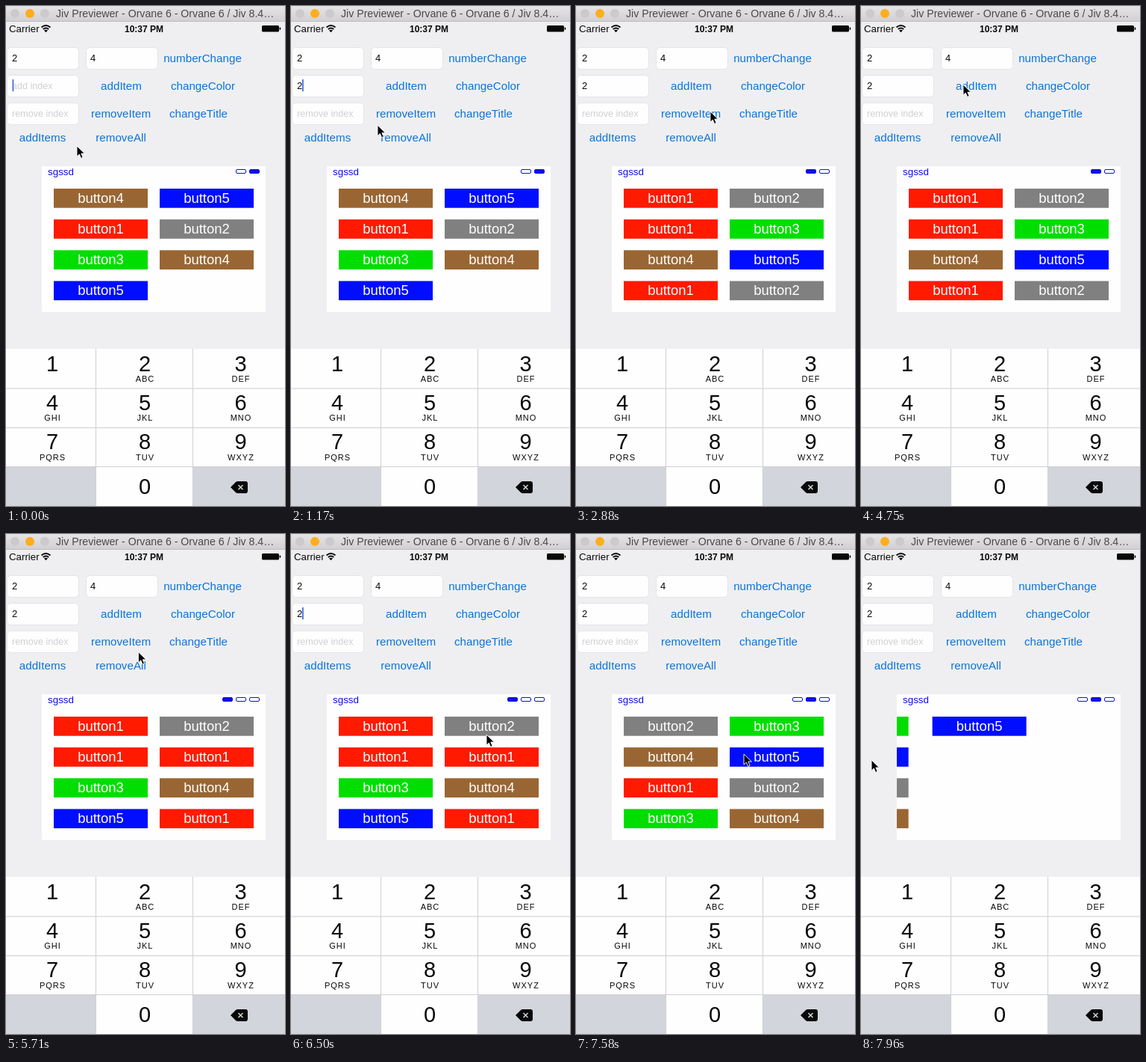
Recreate the animation shown at these times as an HTML page. Size 374 by 668 pixels, loop 8000 ms.

```html
<!DOCTYPE html>
<html lang="en">
<head>
<meta charset="utf-8">
<title>Paged button grid</title>
<style>
  html, body { margin: 0; width: 100%; height: 100%; overflow: hidden; background: #efeff1; }
  svg { display: block; width: 374px; height: 668px; font-family: "Liberation Sans", Arial, sans-serif; }
</style>
</head>
<body>
<svg id="stage" viewBox="0 0 374 668">
  <defs>
    <clipPath id="clip"><rect x="48" y="214" width="300" height="195"/></clipPath>
    <linearGradient id="bar" x2="0" y2="1">
      <stop stop-color="#e6e4e6"/><stop offset="1" stop-color="#d2d0d2"/>
    </linearGradient>
  </defs>
</svg>
<script>
const LOOP = 8000, FIRST_ADD = 1910, SECOND_ADD = 5050, TYPED = 800;
const COLORS = ['#ff1a00', '#808080', '#00de00', '#996633', '#000dff'];
const BACK = '#efeff1', WHITE = '#fefefe', KEY = '#d2d5db', LINE = '#cfd0d4', HINT = '#d0d0d5';
const INK = '#080808', LINK = '#0a74dc', BLUE = '#1010e4';
const stage = document.getElementById('stage');

function el(tag, attrs, parent = stage, text) {
  const node = document.createElementNS('http://www.w3.org/2000/svg', tag);
  for (const k in attrs) node.setAttribute(k, attrs[k]);
  if (text !== undefined) node.textContent = text;
  parent.appendChild(node);
  return node;
}
const rect = (x, y, width, height, fill, more, parent) =>
  el('rect', { x, y, width, height, fill, ...more }, parent);
const label = (x, y, size, fill, text, more, parent) =>
  el('text', { x, y, 'font-size': size, fill, ...more }, parent, text);
const middle = { 'text-anchor': 'middle' };

rect(0, 0, 374, 668, BACK);

// Window title and status bar
rect(0, 0, 374, 20, 'url(#bar)');
rect(0, 20, 374, 1, '#bcbabc');
['#cccacc', '#fdae1c', '#cccacc'].forEach((fill, i) =>
  el('circle', { cx: 12 + 20 * i, cy: 10, r: 6, fill }));
label(67, 15, 14.15, '#4a494a', 'Jiv Previewer - Orvane 6 - Orvane 6 / Jiv 8.4…');
label(4, 35, 13.3, INK, 'Carrier');
el('path', { d: 'M47.5 28.5q6 -5 12 0M49.7 31q3.8 -3 7.6 0', fill: 'none', stroke: INK, 'stroke-width': 1.8 });
el('path', { d: 'M51 32.6q2.5 -1.8 5 0l-2.5 2.6z', fill: INK });
label(185, 35, 12, INK, '10:37 PM', { ...middle, 'font-weight': 'bold' });
rect(343, 26, 23, 8.5, INK, { rx: 1.5 });
rect(366.7, 28.5, 1.5, 3.5, INK, { rx: 0.7 });

// Fields
[[1, 55], [107, 55], [1, 92], [1, 129]].forEach(([x, y]) =>
  rect(x + .5, y + .5, 96, 29, WHITE, { rx: 5, stroke: '#e4e4e7' }));
label(8, 74, 13, INK, '2');
label(113, 74, 13, INK, '4');
const hint = label(8, 111, 12.6, HINT, 'add index');
const typed = label(8, 111, 13, INK, '2');
label(8, 148, 12.6, HINT, 'remove index');
const caret = rect(9, 98, 1.8, 16, '#4a6ee4');

// Text buttons
const link = (x, y, text) => label(x, y, 15.2, LINK, text, middle);
link(263.5, 75, 'numberChange');
const addLink = link(154.5, 112, 'addItem');
link(264, 112, 'changeColor');
link(154, 149, 'removeItem');
link(258, 149, 'changeTitle');
link(49, 181, 'addItems');
link(154, 181, 'removeAll');

// Panel
rect(48, 214, 300, 195, WHITE);
label(56, 226, 13.4, BLUE, 'sgssd');
const dots = [0, 1, 2].map(() =>
  rect(0, 218.5, 13, 5, 'none', { rx: 1.5, stroke: BLUE }));
const clipped = el('g', { 'clip-path': 'url(#clip)' });
const list = el('g', {}, clipped);

function makeItem(number, index, born) {
  const g = el('g', {}, list);
  rect(0, 0, 126, 25.7, COLORS[number - 1], {}, g);
  label(63, 19, 18.5, '#fff', 'button' + number, middle, g);
  return { g, index, born };
}
const items = [];
for (let i = 0; i < 15; i++) {
  if (i === 2) items.push(makeItem(1, 2, SECOND_ADD), makeItem(1, 2, FIRST_ADD));
  items.push(makeItem(i % 5 + 1, i, 0));
}

// Keypad
rect(0, 458, 374, 210, WHITE);
rect(0, 615.5, 120, 53, KEY);
rect(251, 615.5, 123, 53, KEY);
[510.5, 563, 615].forEach(y => rect(0, y, 374, 1, LINE));
[120, 250].forEach(x => rect(x, 458, 1, 210, LINE));
['', 'ABC', 'DEF', 'GHI', 'JKL', 'MNO', 'PQRS', 'TUV', 'WXYZ'].forEach((letters, i) => {
  const x = [62, 186, 314.5][i % 3], y = 487.5 + 52.3 * Math.floor(i / 3);
  label(x, y, 29, INK, i + 1, middle);
  label(x + .5, y + 14.5, 11, INK, letters, { ...middle, 'letter-spacing': 1 });
});
label(186, 652, 29, INK, '0', middle);
el('path', { d: 'M301 643l7 -7q1 -1 3 -1h10q3 0 3 3v10q0 3 -3 3h-10q-2 0 -3 -1z', fill: INK });
el('path', { d: 'M311.5 640l6 6m0 -6l-6 6', stroke: KEY, 'stroke-width': 1.5 });

const cursor = el('path', {
  d: 'M0 0v14.2l3.3 -3.1 2.3 5.3 2.5 -1.1 -2.3 -5.2h4.6z',
  fill: '#000', stroke: '#fff', 'stroke-width': .9
});

// Pointer stops: time, x, y; the last flag marks a straight drag towards that stop
const DRAG1 = [6560, 6850], DRAG2 = [7600, 7870];
const STOPS = [
  [0, 95, 187], [900, 95, 187], [1600, 158, 104], [2100, 158, 104],
  [2700, 180, 141], [3400, 180, 141], [4500, 137, 105], [5350, 137, 105],
  [6300, 262, 268], [DRAG1[0], 262, 268], [DRAG1[1], 125, 290, true],
  [7080, 125, 290], [7500, 225, 294], [DRAG2[0], 225, 294],
  [DRAG2[1], 14, 302, true], [LOOP, 14, 302]
];

const clamp = v => Math.max(0, Math.min(1, v));
const ease = v => (v = clamp(v), v * v * (3 - 2 * v));
const mix = (a, b, p) => a + (b - a) * p;

function pointer(t) {
  const i = Math.max(1, STOPS.findIndex(s => s[0] >= t));
  const a = STOPS[i - 1], b = STOPS[i];
  const u = clamp((t - a[0]) / (b[0] - a[0]));
  const p = b[3] ? u : ease(u);
  return [mix(a[1], b[1], p), mix(a[2], b[2], p)];
}

// Follows the pointer while dragged, then settles on the next page
function swipe(t, [down, up]) {
  if (t < down) return 0;
  const pulled = pointer(down)[0] - pointer(Math.min(t, up))[0];
  return t < up ? pulled : 300 - (300 - pulled) * Math.exp((up - t) / 88);
}

function scrollAt(t) {
  const back = 300 * (1 - ease((t - FIRST_ADD) / 300));
  if (t < DRAG2[0]) return back + swipe(t, DRAG1);
  return 300 + swipe(t, DRAG2);
}

const slot = i => [
  64 + 300 * Math.floor(i / 8) + 142 * (i % 2),
  244 + 41.15 * Math.floor(i % 8 / 2)
];

// Each add pushes the later items one slot on, one after another
function place({ index, born }, t) {
  let [x, y] = slot(index);
  if (born) y = mix(124, y, ease((t - born) / 300));
  for (const time of [FIRST_ADD, SECOND_ADD]) {
    if (time <= born || index < 2) continue;
    const next = slot(++index);
    const p = ease((t - time - (index - 2) * 50) / 300);
    x = mix(x, next[0], p);
    y = mix(y, next[1], p);
  }
  return [x, y];
}

function linkAlpha(t) {
  for (const up of [FIRST_ADD, SECOND_ADD])
    if (t >= up - 90 && t < up + 400) return mix(.2, 1, clamp((t - up) / 400));
  return 1;
}

const move = (node, [x, y]) => node.setAttribute('transform', `translate(${x.toFixed(2)} ${y.toFixed(2)})`);
const show = (node, on) => node.setAttribute('visibility', on ? 'visible' : 'hidden');

function draw(t) {
  move(cursor, pointer(t));
  move(list, [-scrollAt(t), 0]);
  for (const item of items) {
    show(item.g, t >= item.born);
    move(item.g, place(item, t));
  }

  const count = t < SECOND_ADD ? 2 : 3;
  const page = t < FIRST_ADD || t >= 7300 ? 1 : 0;
  dots.forEach((dot, i) => {
    show(dot, i < count);
    dot.setAttribute('x', 344.5 - 18 * (count - i));
    dot.setAttribute('fill', i === page ? BLUE : WHITE);
  });

  const filled = t >= TYPED;
  show(hint, !filled);
  show(typed, filled);
  caret.setAttribute('x', filled ? 15 : 8.5);
  show(caret, filled ? t < 1060 || (t - 60) % 1000 < 510 : t < 500);
  addLink.setAttribute('opacity', linkAlpha(t));
}

const start = performance.now();
function tick() {
  draw((performance.now() - start) % LOOP);
  requestAnimationFrame(tick);
}
tick();
</script>
</body>
</html>
```
